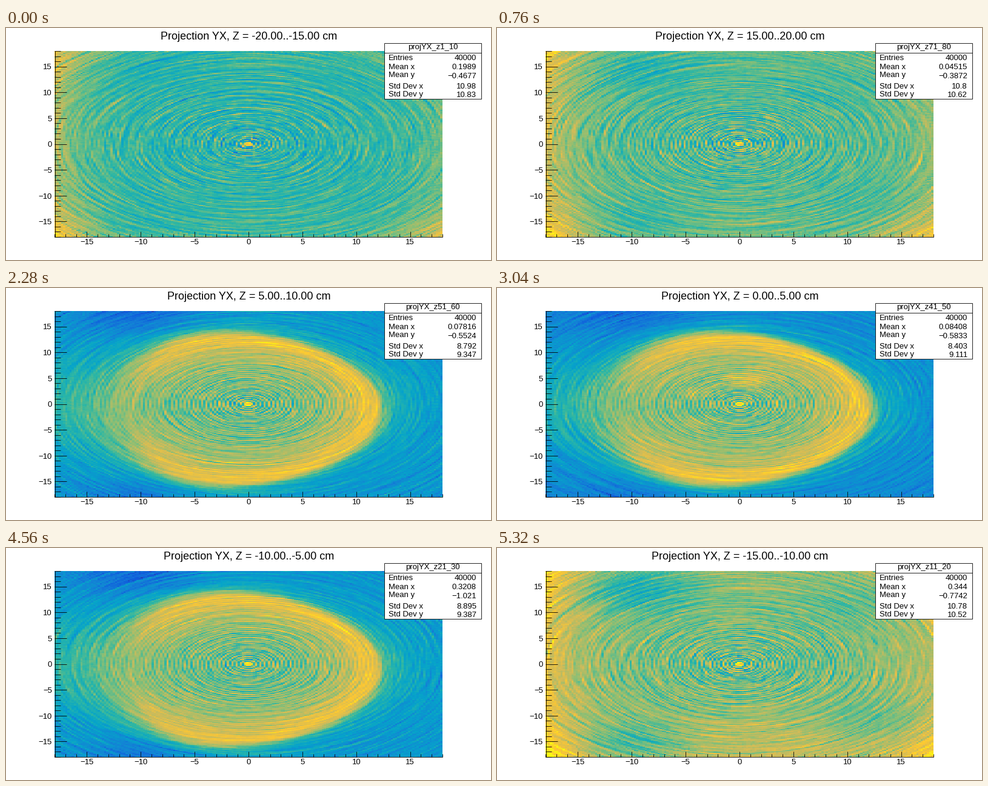
Write a matplotlib script that moves like this. It is 800x383 px and loops after 6080 ms.

```python
import numpy as np
import matplotlib.pyplot as plt
from matplotlib.animation import FuncAnimation
from matplotlib.colors import LinearSegmentedColormap
from matplotlib.patches import Rectangle

W, H, DPI = 800, 383, 100
LEFT, TOP, PW, PH = 80, 38, 640, 307
LIM, STEP, SLICES = 18, 0.2, 8
FONT = "Liberation Sans"

BIRD = LinearSegmentedColormap.from_list(
    "bird", "#352a87 #0f5cdd #1481d6 #06a4ca #2eb7a4 #87bf77 #d1bb59 #fec832 #f9fb0e".split())

# Label text per slice: mean x, mean y, std x, std y
STATS = """0.1989 -0.4677 10.98 10.83
0.04515 -0.3872 10.8 10.62
0.07253 -0.5612 9.693 9.846
0.07816 -0.5524 8.792 9.347
0.08408 -0.5833 8.403 9.111
0.1873 -0.8061 8.492 9.164
0.3208 -1.021 8.895 9.387
0.344 -0.7742 10.78 10.52""".splitlines()

axis = np.arange(-LIM + STEP / 2, LIM, STEP)
X, Y = np.meshgrid(axis, axis)
RAD = np.hypot(X, Y)

# Egg-shaped body: distance from its edge, and how far a point faces left
EGG = np.sqrt((X / 12.3) ** 2 + ((Y + 1) / 14.7) ** 2 * (1 + 0.025 * X))
DIST = 13 * (EGG - 1)
WEST = np.exp(-((np.abs(np.arctan2(Y + 1, X)) - np.pi) / 0.7) ** 2)


def bump(cx, cy, sx, sy):
    return np.exp(-((X - cx) / sx) ** 2 - ((Y - cy) / sy) ** 2)


def grain(rng, angles=180, keep=0.93):
    """Back-projected high-pass noise, correlated between angles, unit variance."""
    t = np.arange(-150, 151) * STEP
    total, ray = np.zeros_like(X), np.zeros(len(t))
    for a in np.arange(angles) * np.pi / angles:
        ray = keep * ray + np.diff(rng.standard_normal(len(t) + 1))
        total += np.interp(X * np.cos(a) + Y * np.sin(a), t, ray)
    total *= RAD ** 0.25
    return total / total.std()


def rings(amp):
    n = RAD / STEP
    wave = np.cos(np.pi * (n - 1.5)) * (n > 1.2)
    size = amp * np.exp(-(RAD / 13) ** 2) + 0.1 * np.exp(-RAD / 3)
    return wave * size + 0.28 * np.exp(-(n / 2.3) ** 4)


def flat(z):
    """Slice beyond the body: even field with bright borders."""
    near, rise = (17.5 - abs(z)) / 5, (z + 17.5) / 35
    dark = 0.05 + 0.14 * near + 0.05 * rise
    v = 0.49 + 0.12 * near + 0.06 * rise + 0.04 * (RAD / 20) ** 4
    v += 0.19 * np.exp(-(X + LIM) / 2.6) + 0.08 * np.exp((X - LIM) / 3)
    for side in (-LIM, LIM):
        v += 0.11 * bump(side, -LIM, 4, 4) + 0.04 * bump(side, LIM, 4, 4)
    v -= dark * (bump(-9.5, 14.5, 5, 4.5) + 0.75 * bump(-10, -15, 4.5, 3.5))
    v -= 0.4 * dark * (bump(11, 12, 5, 4) + bump(12, -11, 5, 4))
    return v + (0.02 + 0.07 * near) * bump(2, -15, 10, 6) - 0.04 * near * bump(0, 0, 9, 6)


def body(z):
    """Slice through the body: bright rim, paler core, blue surroundings."""
    far = z * z / 156
    out = 0.28 + 0.13 * far + 0.13 * bump(-17, 0, 6, 9) + 0.05 * bump(14, 0, 4, 10)
    out -= (0.11 + 0.15 * far) * (bump(-10, 18, 6, 5) + 0.8 * bump(-9.5, -18, 5.5, 4))
    out += 0.18 * np.exp(-np.maximum(DIST, 0) / (1.8 + 1.5 * WEST))
    core = 0.59 - 0.04 * far
    inner = core + (0.84 - core) * np.exp(np.minimum(DIST + 1.3, 0) / 3.4) * (1 - 0.6 * WEST)
    spots = bump(1.2, 4.8, 2.2, 1.4) + 0.5 * (bump(-4, 2.2, 1.5, 1) + bump(-3.8, -3.4, 1.5, 1))
    inner += 0.17 * np.exp(-((z - 2.5) / 4) ** 2) * spots
    mix = 1 / (1 + np.exp(DIST / (0.28 + 1.4 * WEST)))
    return out * (1 - mix) + inner * mix


def z_bin(i):
    """Slices start at the lowest one, then run down from the top."""
    return -i % SLICES


def make_map(i):
    rng = np.random.default_rng(12 + i)
    z = 5 * z_bin(i) - 17.5
    inside = -10 < z < 15
    level = body(z) if inside else flat(z)
    noise = 0.045 if inside else 0.06
    return level + noise * grain(rng) + rings(0.08 if i else 0.055)


MAPS = [make_map(i) for i in range(SLICES)]

fig = plt.figure(figsize=(W / DPI, H / DPI), dpi=DPI, facecolor="white")
plot = fig.add_axes([LEFT / W, 1 - (TOP + PH) / H, PW / W, PH / H])
plot.axis("off")
image = plot.imshow(MAPS[0], cmap=BIRD, vmin=0, vmax=1, origin="lower",
                    aspect="auto", interpolation="nearest")
page = fig.add_axes([0, 0, 1, 1])
page.set(xlim=(0, W), ylim=(H, 0))
page.axis("off")


def label(x, y, s, size=13.1, ha="left"):
    return page.text(x, y, s, fontsize=size * 72 / DPI, family=FONT, ha=ha,
                     va="baseline", color="black")


def line(x0, y0, x1, y1):
    page.plot([x0, x1], [y0, y1], color="black", lw=0.6, solid_capstyle="butt",
              zorder=2.6 if y0 == y1 == 40.5 else 2)


def minus(value):
    return str(value).replace("-", "\u2212")


def draw_axes():
    bottom = TOP + PH
    line(LEFT + 0.5, TOP, LEFT + 0.5, bottom)
    line(LEFT, bottom - 0.5, LEFT + PW, bottom - 0.5)
    for v in range(-LIM, LIM + 1):
        px = LEFT + (v + LIM) * PW / (2 * LIM)
        py = TOP + (LIM - v) * PH / (2 * LIM)
        major = v % 5 == 0
        line(px, bottom, px, bottom - (9 if major else 5))
        line(LEFT, py, LEFT + (20 if major else 10), py)
        if major:
            label(px, 357, minus(v), ha="center")
            label(76, py + 4.8, minus(v), ha="right")


def draw_box():
    page.add_patch(Rectangle((623.5, 24.5), 160, 92, fc="white", ec="black",
                             lw=0.6, zorder=2.5))
    line(623.5, 40.5, 783.5, 40.5)
    names = ("Entries", "Mean x", "Mean y", "Std Dev x", "Std Dev y")
    for name, y in zip(names, (53, 68, 81.5, 99.5, 113.5)):
        label(631, y, name)
    label(776, 53, "40000", ha="right")


draw_axes()
draw_box()
title = label(400.5, 19, "", 18, "center")
head = label(704, 35, "", ha="center")
values = [label(776, y, "", ha="right") for y in (68.5, 83, 99.5, 114.5)]


def update(i):
    first = 10 * z_bin(i) + 1
    z = 5 * z_bin(i) - 20
    image.set_data(MAPS[i])
    title.set_text(f"Projection YX, Z = {z:.2f}..{z + 5:.2f} cm")
    head.set_text(f"projYX_z{first}_{first + 9}")
    for text, value in zip(values, STATS[i].split()):
        text.set_text(minus(value))
    return [image, title, head, *values]


anim = FuncAnimation(fig, update, frames=SLICES, interval=760,
                     init_func=lambda: update(0), repeat=True, repeat_delay=0)
plt.show()
```
